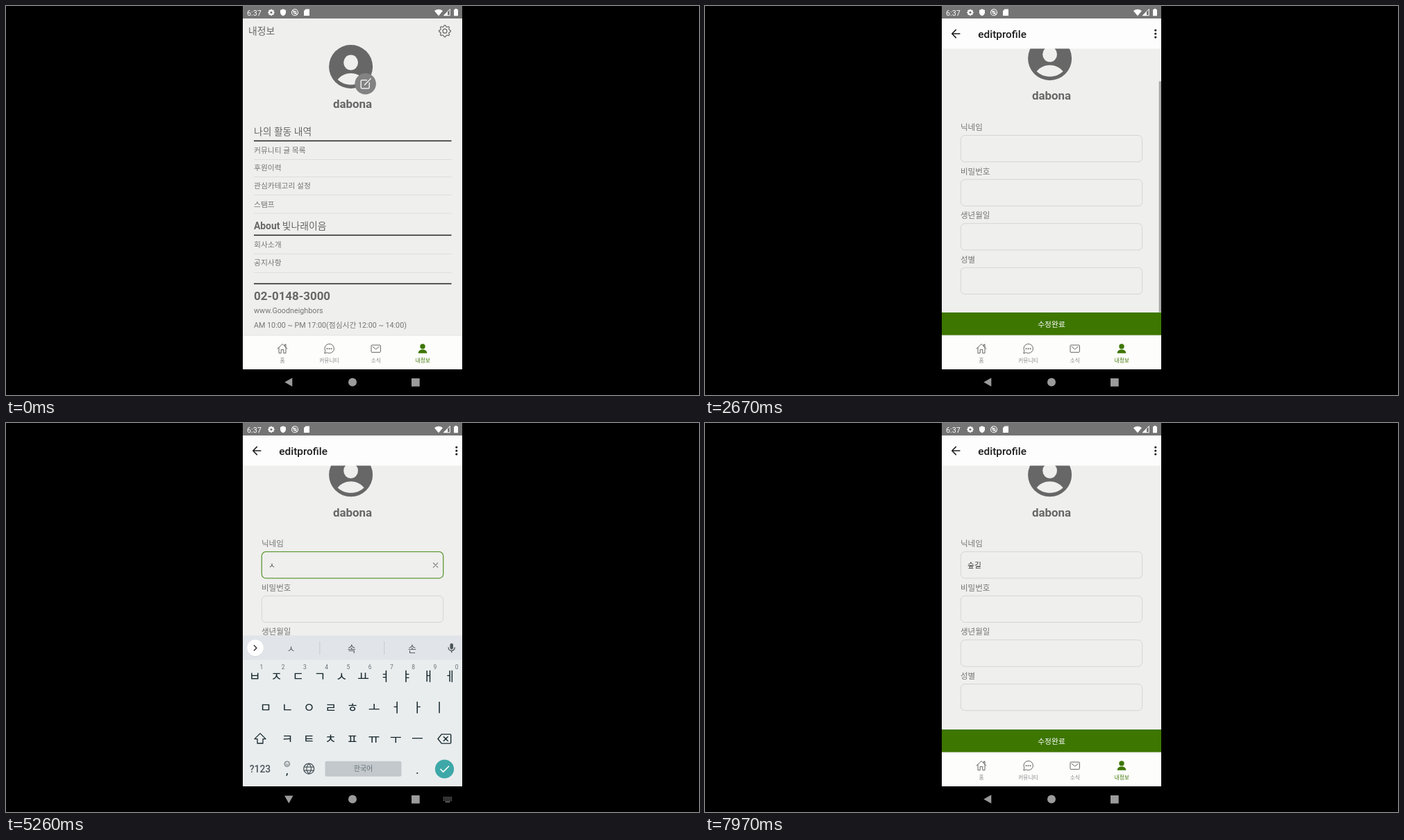
Write an HTML page with a canvas that moves like this. It is 998 px wide and 561 px high and loops after 8 s.

```html
<!DOCTYPE html>
<html lang="ko">
<head>
<meta charset="utf-8">
<title>Edit profile</title>
<style>
html, body { margin: 0; width: 100%; height: 100%; overflow: hidden; background: #000; }
canvas { display: block; }
</style>
</head>
<body>
<canvas id="stage" width="998" height="561"></canvas>
<script>
const c = document.getElementById('stage').getContext('2d');
const FONT = 'Roboto, "Noto Sans CJK KR", "Noto Sans CJK", sans-serif';
const LOOP = 8000, SP = 0.7685;
const BG = '#efefee', DARK = '#676767', GREY = '#757575', GREEN = '#3d7600', KEY = '#17292f', ICON = '#4b565b';
const LEFT = 341, WIDTH = 316, MID = 499;

const clamp = x => Math.max(0, Math.min(1, x));
const span = (t, from, to) => clamp((t - from) / (to - from));
const easeOut = x => 1 - (1 - x) ** 3;
const easeInOut = x => x * x * (3 - 2 * x);

function rect(x, y, w, h, color) {
  c.fillStyle = color;
  c.fillRect(x, y, w, h);
}
function disc(x, y, r, color) {
  c.fillStyle = color;
  c.beginPath();
  c.arc(x, y, r, 0, 7);
  c.fill();
}
function ring(x, y, r, color, w) {
  c.strokeStyle = color;
  c.lineWidth = w;
  c.beginPath();
  c.arc(x, y, r, 0, 7);
  c.stroke();
}
function round(x, y, w, h, r, fill, stroke, lw = 1) {
  c.beginPath();
  c.roundRect(x, y, w, h, r);
  if (fill) { c.fillStyle = fill; c.fill(); }
  if (stroke) { c.strokeStyle = stroke; c.lineWidth = lw; c.stroke(); }
}
// Draws path data around the point x, y
function shape(x, y, d, fill, stroke, w = 1) {
  c.save();
  c.translate(x, y);
  const p = new Path2D(d);
  if (fill) { c.fillStyle = fill; c.fill(p, 'evenodd'); }
  if (stroke) {
    c.strokeStyle = stroke;
    c.lineWidth = w;
    c.lineCap = c.lineJoin = 'round';
    c.stroke(p);
  }
  c.restore();
}
// Text centred vertically on y; size in scaled units
function text(s, x, y, sp, color, weight = 400, align = 'left') {
  const px = sp * SP;
  c.font = `${weight} ${px}px ${FONT}`;
  c.textAlign = align;
  c.fillStyle = color;
  c.fillText(s, x, y + px * 0.37);
  return c.measureText(s).width;
}
function clip(y, h, draw) {
  c.save();
  c.beginPath();
  c.rect(LEFT, y, WIDTH, h);
  c.clip();
  draw();
  c.restore();
}
function scaled(s, alpha, draw) {
  c.save();
  c.globalAlpha = alpha;
  c.translate(MID, 246.5);
  c.scale(s, s);
  c.translate(-MID, -246.5);
  draw();
  c.restore();
}
function gear(x, y, r, teeth, color, w) {
  c.beginPath();
  for (let i = 0; i < teeth * 4; i++) {
    const a = (i - 0.5) / (teeth * 4) * Math.PI * 2 - Math.PI / 2;
    const d = i % 4 < 2 ? r : r * 0.78;
    c.lineTo(x + Math.cos(a) * d, y + Math.sin(a) * d);
  }
  c.closePath();
  c.lineJoin = 'round';
  c.lineWidth = w;
  c.strokeStyle = c.fillStyle = color;
  c.stroke();
}

function statusBar() {
  rect(LEFT, 0, WIDTH, 18, '#747474');
  text('6:37', 347, 9.6, 14, '#fff');
  gear(382, 9.3, 4.4, 8, '#fff', 0.8);
  c.fill();
  disc(382, 9.3, 1.6, '#747474');
  shape(399, 9.3, 'M0-5 4-3.4V0C4 2.6 2.2 4.4 0 5-2.2 4.4-4 2.6-4 0V-3.4Z', '#fff');
  ring(416, 9.3, 4.5, '#fff', 1.1);
  ring(416, 9.3, 2, '#fff', 1);
  shape(416, 9.3, 'M-3-3 3 3', null, '#fff', 1.1);
  shape(433, 9.3, 'M-1.4-4.8H4V4.8H-4V-2.2ZM-1.4-3.4V-1.4M.5-3.4V-1.4M2.3-3.4V-1.4', '#fff');
  shape(623, 9.3, 'M0 5-6-2.4Q0-6.8 6-2.4Z', '#fff');
  shape(635, 9.3, 'M-4.3 4.4H4.3V-4.4Z', null, '#fff', 1);
  shape(635, 9.3, 'M-4.3 4.4H1V-1Z', '#fff');
  round(645, 5, 6, 9.2, 0.8, '#fff');
  rect(646.6, 3.9, 2.8, 1.5, '#fff');
}

function navBar(turn, ime) {
  rect(LEFT, 524, WIDTH, 37, '#000');
  c.save();
  c.translate(407.3, 542.5);
  c.rotate(-turn * Math.PI / 2);
  shape(0, 0, 'M-6 0 5-6.2V6.2Z', '#9b9b9b');
  c.restore();
  disc(499, 542.5, 6, '#9b9b9b');
  rect(584, 537, 11.7, 11.7, '#9b9b9b');
  if (!ime) return;
  for (let r = 0; r < 3; r++)
    for (let i = 0; i < 6; i++) rect(629.8 + i * 2.2, 539.2 + r * 2.2, 1.3, 1.3, '#8d8d8d');
  rect(632.5, 545.8, 7, 1.2, '#8d8d8d');
}

function tabs() {
  rect(LEFT, 475, WIDTH, 49, '#fdfdfc');
  rect(LEFT, 474.6, WIDTH, 0.8, '#dededb');
  shape(398, 494, 'M-7 .3 0-6.5 7 .3M-5-1.5V6.6H-1.8V1.6H1.8V6.6H5V-1.5M3.4-3.5V-6H5V-2', null, '#666', 1);
  shape(465.5, 494, 'M-6.6 6.6-5.7 3.2A6.7 6.7 0 1 1-2.8 6Z', null, '#666', 1);
  for (const dx of [-3, 0, 3]) disc(465.5 + dx, 494.3, 1, '#666');
  round(526, 489, 13.4, 10.4, 1, null, '#666');
  shape(532.7, 494, 'M-4.6-2.6 0 1 4.6-2.6', null, '#666', 1);
  shape(600, 494, 'M-6.3 6.8C-6.3 2.9-3.4 1.4 0 1.4S6.3 2.9 6.3 6.8Z', GREEN);
  disc(600, 490.9, 3.7, GREEN);
  ['홈', '커뮤니티', '소식', '내정보'].forEach((s, i) =>
    text(s, 398 + i * 67.4, 511, 10, i === 3 ? GREEN : '#888', 400, 'center'));
}

function avatar(y) {
  disc(496.6, y, 31.5, DARK);
  c.fillStyle = BG;
  c.beginPath();
  c.ellipse(496.6, y - 6, 10.4, 11, 0, 0, 7);
  c.fill();
  shape(496.6, y, 'M-19 18.5C-9 6.5 9 6.5 19 18.5 9 28.5-9 28.5-19 18.5Z', BG);
  text('dabona', MID, y + 53.5, 22, DARK, 700, 'center');
}

function profile() {
  rect(LEFT, 18, WIDTH, 457, BG);
  text('내정보', 349, 35.5, 18, DARK, 500);
  gear(632, 36.2, 8.4, 8, DARK, 1.2);
  ring(632, 36.2, 3, DARK, 1.2);
  avatar(87.5);
  disc(517.6, 112.2, 15.3, '#828282');
  shape(517.6, 112.2, 'M2-5.4H-4.8Q-6.4-5.4-6.4-3.8V5Q-6.4 6.6-4.8 6.6H4Q5.6 6.6 5.6 5V-1.6M-1.2 1.5 7.8-7.6', null, '#fff', 1.3);
  text('나의 활동 내역', 357, 180.5, 18, DARK, 500);
  text('About', 357, 317, 18, DARK, 700);
  text('빛나래이음', 397.8, 317, 18, DARK, 500);
  for (const y of [194.5, 330.5, 400.5]) rect(357, y - 0.75, 284.5, 1.5, '#202020');
  for (const y of [221.5, 246.5, 272.5, 299, 357.5, 384.5]) rect(357, y - 0.4, 284.5, 0.8, '#d9d9d7');
  const rows = { '커뮤니티 글 목록': 208, '후원이력': 233, '관심카테고리 설정': 259, '스탬프': 286, '회사소개': 344, '공지사항': 370.5 };
  for (const s in rows) text(s, 357, rows[s], 14, GREY);
  text('02-0148-3000', 357, 417.5, 22, DARK, 700);
  text('www.Goodneighbors', 357, 439.5, 14, GREY);
  text('AM 10:00 ~ PM 17:00(점심시간 12:00 ~ 14:00)', 357, 459.8, 14, GREY);
}

const strokes = [[3560, ''], [4600, 'ㅅ'], [5300, '소'], [6010, '숲'], [6540, '숲기'], [6800, '숲길']];
const BLUR = 7400;
const typed = t => strokes.filter(s => s[0] <= t).pop() || [0, ''];

function form(t) {
  const off = 55.5 * easeInOut(span(t, 2300, 2700));
  const [since, word] = typed(t);
  const focus = t >= strokes[0][0] && t < BLUR;
  rect(LEFT, 18, WIDTH, 457, BG);
  c.save();
  c.translate(0, -off);
  text('내 정보 수정', 349, 79, 20, DARK, 500);
  avatar(130.3);
  ['닉네임', '비밀번호', '생년월일', '성별'].forEach((s, i) => {
    const y = 241.2 + i * 63.6, on = focus && !i;
    text(s, 368, y - 11.7, 15, GREY);
    round(368.3, y, 261.4, 38.2, 6, null, on ? '#609a35' : '#d5d5d3', on ? 1.3 : 1);
  });
  const w = text(word, 378, 260.2, 14, '#3c3c3c');
  if (focus) {
    if (Math.floor((t - since) / 500) % 2 === 0) rect(378 + w, 252.2, 1.5, 15.4, '#26887f');
    shape(618.6, 260.5, 'M-3.2-3.2 3.2 3.2M3.2-3.2-3.2 3.2', null, '#777', 1.1);
  }
  c.restore();

  const bar = t < 4170 ? 1 - 0.86 * span(t, 2980, 3140) : 0;
  c.save();
  c.globalAlpha *= bar;
  rect(653.7, 61 + off * 0.87, 3.3, 333, '#a8a8a8');
  c.restore();

  rect(LEFT, 18, WIDTH, 43.5, '#fdfdfd');
  shape(361.3, 40, 'M5.6 0H-5.4M0-5.6-5.6 0 0 5.6', null, '#1c1c1c', 1.5);
  text('editprofile', 393.3, 40.4, 20, '#1c1c1c', 500);
  for (const dy of [-5, 0, 5]) disc(648.8, 40 + dy, 1.6, '#1c1c1c');
  rect(LEFT, 442, WIDTH, 33, GREEN);
  text('수정완료', MID, 458.6, 14, '#fff', 400, 'center');
}

function keyboard(word) {
  rect(LEFT, 306.5, WIDTH, 218, '#eaedee');
  rect(LEFT, 306.5, WIDTH, 35, '#e1e4e8');
  disc(359, 325, 12, '#d3d6da');
  disc(359, 324.4, 11.8, '#fff');
  shape(359, 324.4, word ? 'M-1.7-3.6 1.9 0-1.7 3.6' : 'M1.7-3.6-1.9 0 1.7 3.6', null, '#333', 1.4);
  if (word) {
    [word, '속', '손'].forEach((s, i) => text(s, 410.5 + i * 87.3, 325, 17, ICON, 400, 'center'));
    rect(451.5, 315, 0.9, 19, '#c3c8cc');
    rect(544.3, 315, 0.9, 19, '#c3c8cc');
  } else {
    ring(400, 323, 4, ICON, 1.5);
    shape(401, 324.5, 'M2.2 1.8 6 5.6', null, ICON, 1.6);
    shape(447.3, 324.5, 'M-4.5-5.6H4.5Q5.6-5.6 5.6-4.5V1.2L1.2 5.6H-4.5Q-5.6 5.6-5.6 4.5V-4.5Q-5.6-5.6-4.5-5.6M5.6 1.2H1.2V5.6M-2.8.6Q-1.2 3 .6 2M-2-2.2V-1.8M2-2.2V-1.8', null, ICON, 1.3);
    text('GIF', 493, 324.6, 13, ICON, 700, 'center');
    round(534.2, 318.6, 12, 12, 1, '#59646a');
    rect(568, 316, 0.9, 17, '#c3c8cc');
    for (const dx of [-5, 0, 5]) disc(596.7 + dx, 324.6, 1.5, ICON);
  }
  round(639.4, 317.8, 4.6, 8.6, 2.3, ICON);
  shape(641.7, 324.4, 'M-4.6-.6A4.6 4.6 0 0 0 4.6-.6M0 4V6.4', null, ICON, 1.3);

  const row = (s, x, y) => [...s].forEach((k, i) => {
    text(k, x + i * 31.25, y, 24, KEY, 400, 'center');
    if (y < 380) text((i + 1) % 10, x + i * 31.25 + 9.5, 352.3, 11, '#667277', 400, 'center');
  });
  row('ㅂㅈㄷㄱㅅㅛㅕㅑㅐㅔ', 358.3, 365);
  row('ㅁㄴㅇㄹㅎㅗㅓㅏㅣ', 374, 410);
  row('ㅋㅌㅊㅍㅠㅜㅡ', 405, 455);
  shape(366, 455, 'M0-7.4 8 .6H4V7H-4V.6H-8Z', null, KEY, 1.3);
  shape(631.5, 455.5, 'M-9.5 0-4.2-6.6H8.2Q9.2-6.6 9.2-5.6V5.6Q9.2 6.6 8.2 6.6H-4.2ZM-1.2-3 4.8 3M4.8-3-1.2 3', null, KEY, 1.4);
  text('?123', 366, 499, 18, ICON, 500, 'center');
  ring(404.8, 491.7, 3.8, ICON, 0.9);
  shape(404.8, 491.7, 'M-2 .8Q0 3.2 2 .8M-1.4-1.3V-1.1M1.4-1.3V-1.1', null, ICON, 0.9);
  text(',', 404.8, 501, 20, KEY, 500, 'center');
  ring(436.2, 498.6, 7.5, ICON, 1.3);
  shape(436.2, 498.6, 'M-7-2.5H7M-7 2.5H7M0-7.4C-4.4-3-4.4 3 0 7.4 4.4 3 4.4-3 0-7.4', null, ICON, 1.1);
  round(459.5, 487.8, 110, 22, 2, '#c2c8cc');
  text('한국어', 514.5, 498.8, 13, '#667177', 400, 'center');
  text('.', 592.3, 500.5, 20, KEY, 500, 'center');
  disc(631.5, 499, 13.6, '#3ea8a9');
  shape(631.5, 499, 'M-5.6.3-1.8 4.1 6-3.8', null, '#fff', 1.6);
}

function draw(t) {
  rect(0, 0, 998, 561, '#000');
  const p = easeOut(span(t, 860, 1260));
  clip(18, 457, () => {
    rect(LEFT, 18, WIDTH, 457, BG);
    if (p < 1) {
      scaled(1 + 0.077 * p, 1, profile);
      c.globalAlpha = p;
      rect(LEFT, 18, WIDTH, 457, BG);
      c.globalAlpha = 1;
    }
    const shown = clamp((p - 0.74) / 0.26);
    if (shown > 0) scaled(0.85 + 0.15 * p, shown, () => form(t));
  });
  tabs();
  statusBar();
  const up = easeOut(span(t, 3640, 3880)) - easeInOut(span(t, 7430, 7650));
  if (up > 0) clip(306, 218, () => {
    c.translate(0, 218 * (1 - up));
    keyboard(typed(t)[1]);
  });
  const turn = easeInOut(span(t, 3530, 3740)) - easeInOut(span(t, 7430, 7640));
  navBar(turn, t >= 3530 && t < 7640);
}

function tick() {
  draw(performance.now() % LOOP);
  requestAnimationFrame(tick);
}
tick();
</script>
</body>
</html>
```
